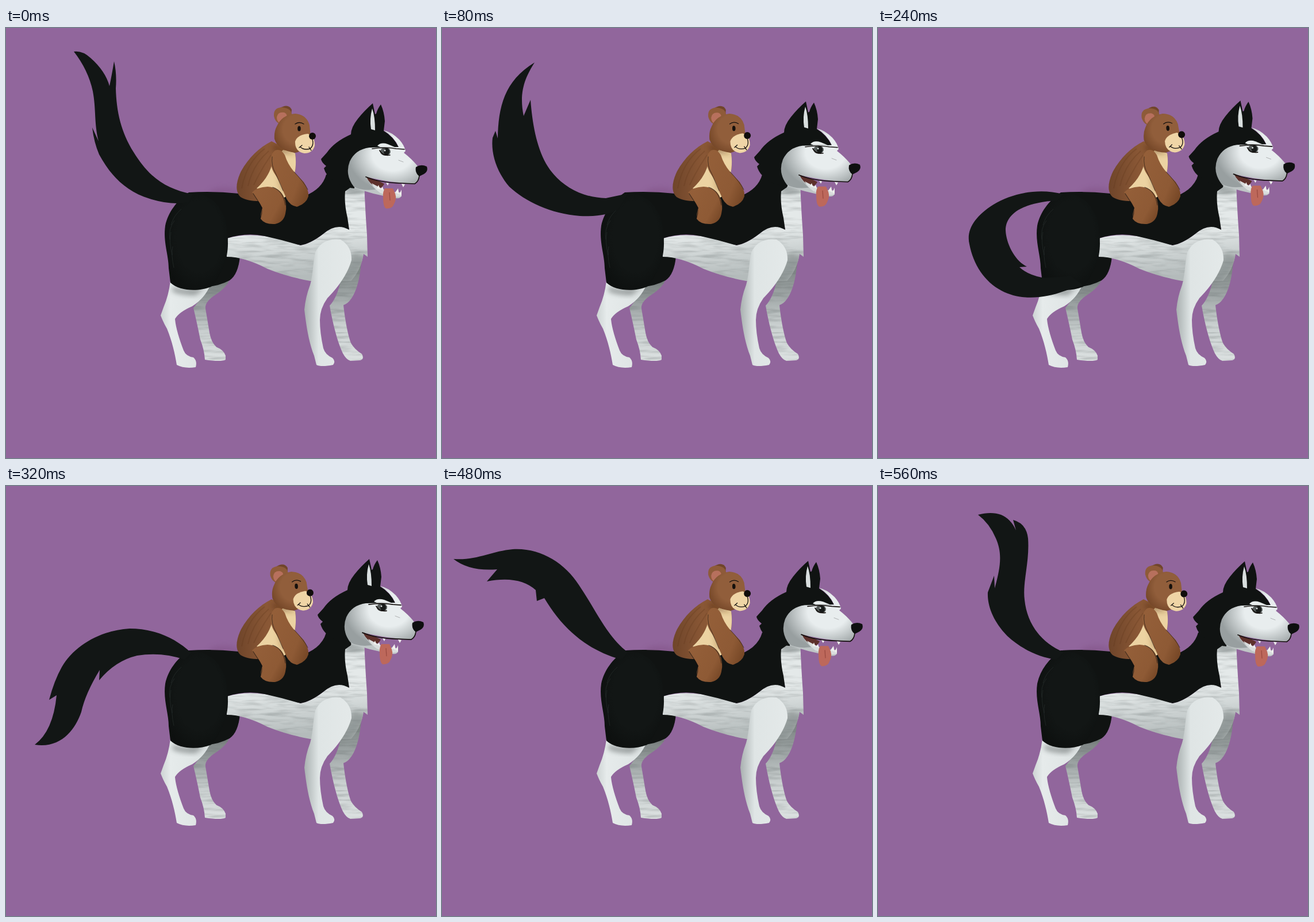
These frames come from a looping animation (748x748 px, 0.64 s). An HTML page:

```html
<!DOCTYPE html>
<html lang="en">
<head>
<meta charset="utf-8">
<title>Husky and teddy bear</title>
<style>
html, body { margin: 0; width: 100%; height: 100%; overflow: hidden; background: #91669c; }
svg { display: block; width: 100vw; height: 100vh; }
.tail { fill: #121615; visibility: hidden; }
.tail.on { visibility: visible; }
.black { fill: #101312; }
.ink { fill: none; stroke: #15110f; stroke-linecap: round; stroke-linejoin: round; }
.soft { filter: url(#blur); }
</style>
</head>
<body>
<svg viewBox="0 0 748 748">
<defs>
  <filter id="blur" x="-50%" y="-50%" width="200%" height="200%"><feGaussianBlur stdDeviation="5"/></filter>
  <filter id="fur" x="0" y="0" width="100%" height="100%" color-interpolation-filters="sRGB">
    <feTurbulence type="fractalNoise" baseFrequency=".02 .2" numOctaves="3" seed="4"/>
    <feColorMatrix values="0 0 0 0 .3  0 0 0 0 .33  0 0 0 0 .33  .6 0 0 0 -.27"/>
    <feComposite in2="SourceGraphic" operator="in" result="streaks"/>
    <feMerge><feMergeNode in="SourceGraphic"/><feMergeNode in="streaks"/></feMerge>
  </filter>
  <linearGradient id="belly" x1="0" y1="0" x2=".12" y2="1">
    <stop offset=".55" stop-color="#e4e9e9"/><stop offset="1" stop-color="#b4bbbb"/>
  </linearGradient>
  <linearGradient id="foreleg"><stop stop-color="#a9b0b0"/><stop offset=".3" stop-color="#dfe5e5"/><stop offset="1" stop-color="#e4e9e9"/></linearGradient>
  <linearGradient id="hindleg"><stop stop-color="#cdd3d3"/><stop offset=".2" stop-color="#e6ebeb"/><stop offset="1" stop-color="#dce2e2"/></linearGradient>
  <linearGradient id="far" x1="0" y1="0" x2="0" y2="1">
    <stop stop-color="#747b7a"/><stop offset=".35" stop-color="#a0a7a7"/><stop offset=".65" stop-color="#cbd1d1"/><stop offset="1" stop-color="#dce1e1"/>
  </linearGradient>
  <radialGradient id="thigh" cx=".55" cy=".45" r=".6">
    <stop offset=".6" stop-color="#121615"/><stop offset="1" stop-color="#0d100f"/>
  </radialGradient>
  <radialGradient id="face" cx=".62" cy=".4" r=".62">
    <stop offset=".45" stop-color="#e8edee"/><stop offset="1" stop-color="#989fa0"/>
  </radialGradient>
  <linearGradient id="brown"><stop stop-color="#6f452a"/><stop offset=".5" stop-color="#895735"/><stop offset="1" stop-color="#8f5d3a"/></linearGradient>
  <linearGradient id="limb" x1="0" y1=".2" x2="1" y2=".8"><stop stop-color="#945f39"/><stop offset=".7" stop-color="#8e5a35"/><stop offset="1" stop-color="#764726"/></linearGradient>
  <radialGradient id="bearFace" cx=".6" cy=".4" r=".65"><stop offset=".55" stop-color="#915e3b"/><stop offset="1" stop-color="#754728"/></radialGradient>
  <clipPath id="chestClip"><path id="chest" d="M384 366Q415 357 450 362T512 378Q530 375 552 358Q575 338 597 350L578 270H623Q625 320 628 360L629 398L622 393Q618 420 600 440L529 440Q490 433 455 419Q415 398 384 398Z"/></clipPath>
  <clipPath id="bearBody"><path id="torso" d="M462 197C440 208 422 226 409 249C400 268 398 284 408 294C425 305 460 302 486 294C500 270 507 245 503 218Z"/></clipPath>
</defs>

<rect width="748" height="748" fill="#91669c"/>
<ellipse class="soft" cx="380" cy="288" rx="28" ry="11" fill="#805184" opacity=".45"/>

<!-- far legs -->
<g fill="url(#far)" filter="url(#fur)">
  <path d="M618 405C616 440 606 476 587 482C590 510 595 535 600 548Q606 559 619 567Q624 576 616 578L599 579Q592 577 586 566C576 545 568 512 563 483Q576 469 582 440Z"/>
  <path d="M389 437Q385 450 366 463C352 472 346 480 347 488L354 530Q357 547 366 555Q379 560 382 570V577Q374 581 346 577Q345 560 338 542Q332 512 326 487Q342 468 352 445Z"/>
</g>
<path class="black" d="M382 397H407C405 418 399 432 389 439Q370 449 350 450Z"/>

<!-- torso -->
<g filter="url(#fur)"><use href="#chest" fill="url(#belly)"/></g>
<g clip-path="url(#chestClip)">
  <path class="soft" d="M586 270L630 280Q620 292 590 288Z" fill="#717979" opacity=".6"/>
  <path class="soft" d="M604 390L632 398L600 445L575 444Z" fill="#7b8382" opacity=".6"/>
</g>
<path class="black" d="M318 286Q360 283 405 288L520 292Q550 280 557 255L606 240L600 277L590 284Q588 305 594 330L597 351Q575 338 552 358Q530 375 512 378Q482 369 450 362T384 366L340 390Z"/>
<path d="M286 440Q283 465 274 486L269 500Q274 513 280 523C289 545 294 567 297 586Q310 593 330 590Q333 579 326 573Q313 571 309 561C301 540 295 520 294 506Q301 494 324 484Q346 470 356 446Z" fill="url(#hindleg)"/>
<path class="soft" d="M289 450Q315 460 347 451L330 464Q305 464 290 458Z" fill="#4d5353" opacity=".6"/>
<path d="M318 286C297 301 282 320 277 344C273 372 283 395 283 418L286 443C302 458 335 459 357 450C376 430 386 402 386 375C388 330 370 287 318 286Z" fill="url(#thigh)"/>
<path d="M287 343Q291 327 305 315M285 368Q282 350 293 335M289 395Q283 370 287 355M292 417Q287 395 290 380" fill="none" stroke="#29302e" stroke-width="1" opacity=".65"/>
<path d="M538 390C534 408 534 430 529 447Q521 468 519 490C522 515 526 545 536 570L540 586Q548 590 569 586Q574 580 568 574Q555 568 552 557Q546 530 546 508Q546 488 559 470C576 453 594 429 601 404Q602 380 582 368Q551 364 538 390Z" fill="url(#foreleg)"/>

<!-- tail, one pose per step -->
<g id="tails">
  <path class="tail" d="M118 41Q133 39 147 52Q173 75 180 101Q184 82 188 58Q193 80 191 105C192 145 200 181 222 216C248 258 276 280 325 289L318 303Q288 309 250 297C207 284 181 255 162 220Q153 199 150 173L161 197C153 165 157 142 151 110Q143 73 118 41Z"/>
  <path class="tail" d="M161 60C146 84 133 110 142 153L154 125C157 165 164 205 181 236C202 272 240 295 285 296L323 288L307 315Q285 329 240 327C189 323 145 302 117 276C93 248 85 215 88 191L93 179L97 192C98 138 108 92 161 60Z"/>
  <path class="tail" d="M323 290C300 271 266 261 228 262C168 263 121 285 97 316Q84 337 78 364L84 359C68 405 74 470 119 512Q110 480 109 447L114 444L123 464C127 423 140 378 163 347C190 314 235 297 275 297L312 304Z"/>
  <path class="tail" d="M322 289C280 278 234 287 201 307C169 327 153 351 159 376C166 412 185 441 215 457C249 475 290 470 323 458L356 447L335 431Q310 435 285 434Q260 429 246 416L259 415C238 405 223 375 222 352C222 327 245 304 312 300Z"/>
  <path class="tail" d="M322 290C294 264 258 248 215 248C165 251 119 277 97 315Q84 338 75 372L88 364Q82 426 50 450C95 457 120 425 131 393Q138 361 163 320L162 338Q190 304 228 295Q270 288 311 302Z"/>
  <path class="tail" d="M320 291C307 259 286 230 255 208C226 191 195 190 163 204C133 218 114 241 111 272Q107 295 98 303L119 295C112 323 98 337 71 339Q92 345 110 341C139 330 150 303 157 278Q162 253 178 247L174 263Q190 245 215 243C250 241 279 260 314 300Z"/>
  <path class="tail" d="M323 289C287 262 268 216 238 172C213 133 170 107 123 110C87 113 60 130 20 127Q48 149 96 145L78 166Q134 155 163 181L165 200L178 195C205 240 244 283 312 302Z"/>
  <path class="tail" d="M174 50Q197 44 214 50Q231 57 240 77L235 59Q258 65 261 91C264 133 251 167 255 198C259 238 282 272 323 289L310 302C280 298 250 284 225 261C200 235 190 208 191 185L202 156L203 178C214 139 216 116 205 91Q194 65 174 50Z"/>
</g>

<!-- bear -->
<g>
  <use href="#torso" fill="url(#brown)"/>
  <g clip-path="url(#bearBody)">
    <path d="M482 212L512 218L504 258L484 298L436 279Q459 258 464 232Z" fill="#ecd3a2"/>
    <path class="soft" d="M472 232L482 266L490 289L476 280Z" fill="#a87945" opacity=".5"/>
    <path class="soft" d="M465 201L505 219L465 215Z" fill="#603516" opacity=".6"/>
    <path d="M450 210Q418 234 410 279M457 214Q429 238 421 275M461 221Q443 247 431 273" fill="none" stroke="#5c3418" stroke-width="2" opacity=".25"/>
  </g>
  <path d="M468 213C457 222 459 241 467 253Q476 266 481 281L488 297Q494 309 506 311Q522 306 526 293Q527 282 518 268L501 250Q490 237 485 221Q478 209 468 213Z" fill="url(#limb)"/>
  <path class="ink" d="M463 224Q461 239 469 253L482 283M501 250Q519 269 525 281" stroke="#5b3419" stroke-width="1" opacity=".6"/>
  <path d="M428 286Q436 277 455 276Q474 277 482 291Q490 306 486 323Q483 338 468 341Q450 342 443 332Q443 320 446 313Q438 298 428 286Z" fill="url(#limb)"/>
  <path class="ink" d="M430 288L441 305Q448 316 443 330M464 277Q482 283 486 308" stroke="#603719" stroke-width="1.2" opacity=".6"/>
  <g id="bearHead">
    <path d="M475 140Q491 130 497 142L496 153H478Z" fill="#70452a"/>
    <path d="M466 153Q465 138 481 138Q498 140 497 153L484 168Q469 168 466 153Z" fill="#8e5b39"/>
    <path d="M471 155Q473 145 484 147Q492 151 486 160L478 166Q471 164 471 155Z" fill="#b7705d"/>
    <path d="M471 171Q480 151 503 149Q523 151 528 169L530 190Q522 214 503 217Q473 213 467 193Q466 180 471 171Z" fill="url(#bearFace)"/>
    <path d="M503 197Q507 186 525 184Q538 189 537 205Q533 218 519 218Q502 215 503 197Z" fill="#efd5a6"/>
    <ellipse cx="533" cy="188" rx="6" ry="6" fill="#100d0b"/>
    <ellipse cx="510" cy="175" rx="2.8" ry="4.6" fill="#15100c"/>
    <path class="ink" d="M503 167Q510 162 518 167M533 194Q536 204 529 210Q518 213 512 207M510 208L515 204M527 207L531 213" stroke-width="1.3"/>
  </g>
</g>

<!-- husky head -->
<g id="dogHead">
  <path d="M594 243L626 258Q637 275 653 282L687 290Q689 297 678 296Q635 289 601 276Z" fill="#bfc5c6"/>
  <path d="M626 258L650 267L658 271Q653 281 645 278Q633 272 626 258Z" fill="#5d302b"/>
  <path d="M636 270L657 281L673 285Q683 287 688 285V293Q674 296 651 287Q641 280 636 270Z" fill="#d9dddd"/>
  <path d="M645 279L648 273L651 281L655 276L657 282ZM677 286L682 279L684 290L688 281V291Z" fill="#f0f1ee"/>
  <path d="M659 279Q655 285 656 295Q656 311 661 314Q672 315 675 306Q680 297 677 288L673 279Z" fill="#bd685b"/>
  <path d="M667 286L668 300" stroke="#98483f" stroke-width="1.2"/>
  <path class="black" d="M548 228L558 217Q571 198 600 185Q600 173 612 158Q624 143 638 131L642 150L644 149Q646 141 652 133Q658 146 659 162L657 179Q673 188 683 207L665 209L625 222L607 245L606 279Q580 276 570 266Q557 258 553 244L557 240Q549 234 548 228Z"/>
  <path d="M637 140Q632 158 635 176L642 178Q642 154 637 140Z" fill="#d9dfdf"/>
  <path d="M657 178Q671 181 684 194Q693 204 695 214L692 217Q705 227 715 239L720 256Q719 265 712 270Q677 271 627 259Q632 271 643 281Q619 284 605 276Q589 255 598 232Q608 211 632 208L683 207Q676 190 657 178Z" fill="url(#face)"/>
  <path d="M646 205Q652 198 664 202L676 207H651Z" fill="#e7ecec"/>
  <ellipse cx="660" cy="215" rx="9" ry="7" fill="#555b5a"/>
  <ellipse cx="662" cy="215" rx="5" ry="6" fill="#171a19"/>
  <circle cx="659" cy="213" r="1.5" fill="#d9dfdf"/>
  <path class="ink" d="M637 210Q660 207 679 210L693 211M650 213Q655 223 668 221M626 259Q650 269 688 270L711 271Q718 267 719 257" stroke-width="1.7"/>
  <path d="M661 269L664 274L666 270ZM688 271L691 277L694 272Z" fill="#eff1ee"/>
  <path class="ink" d="M683 230L691 233" stroke-width=".8" opacity=".35"/>
  <path d="M713 242Q722 236 732 241Q735 249 727 254L719 258Q711 252 713 242Z" fill="#0e0f0f"/>
</g>
</svg>
<script>
const STEP = 80;
const tails = [...document.querySelectorAll('.tail')];
const dogHead = document.getElementById('dogHead');
const bearHead = document.getElementById('bearHead');
const dogLift = [0, 5, 6, 7.5, 6, 2.7, 1, 0];
const bearLean = [0, 2.5, 4, 6.5, 5.5, 4, 2.5, 1];

function draw(now) {
  const step = Math.floor(now / STEP) % tails.length;
  tails.forEach((tail, i) => tail.classList.toggle('on', i === step));
  const lift = dogLift[step], lean = bearLean[step];
  dogHead.setAttribute('transform', `translate(${-lift} ${-lift * .65})`);
  bearHead.setAttribute('transform', `translate(${-lean * .4}) rotate(${-lean * .7} 500 215)`);
}

const start = performance.now();
function tick() {
  draw(performance.now() - start);
  requestAnimationFrame(tick);
}
tick();
</script>
</body>
</html>
```
